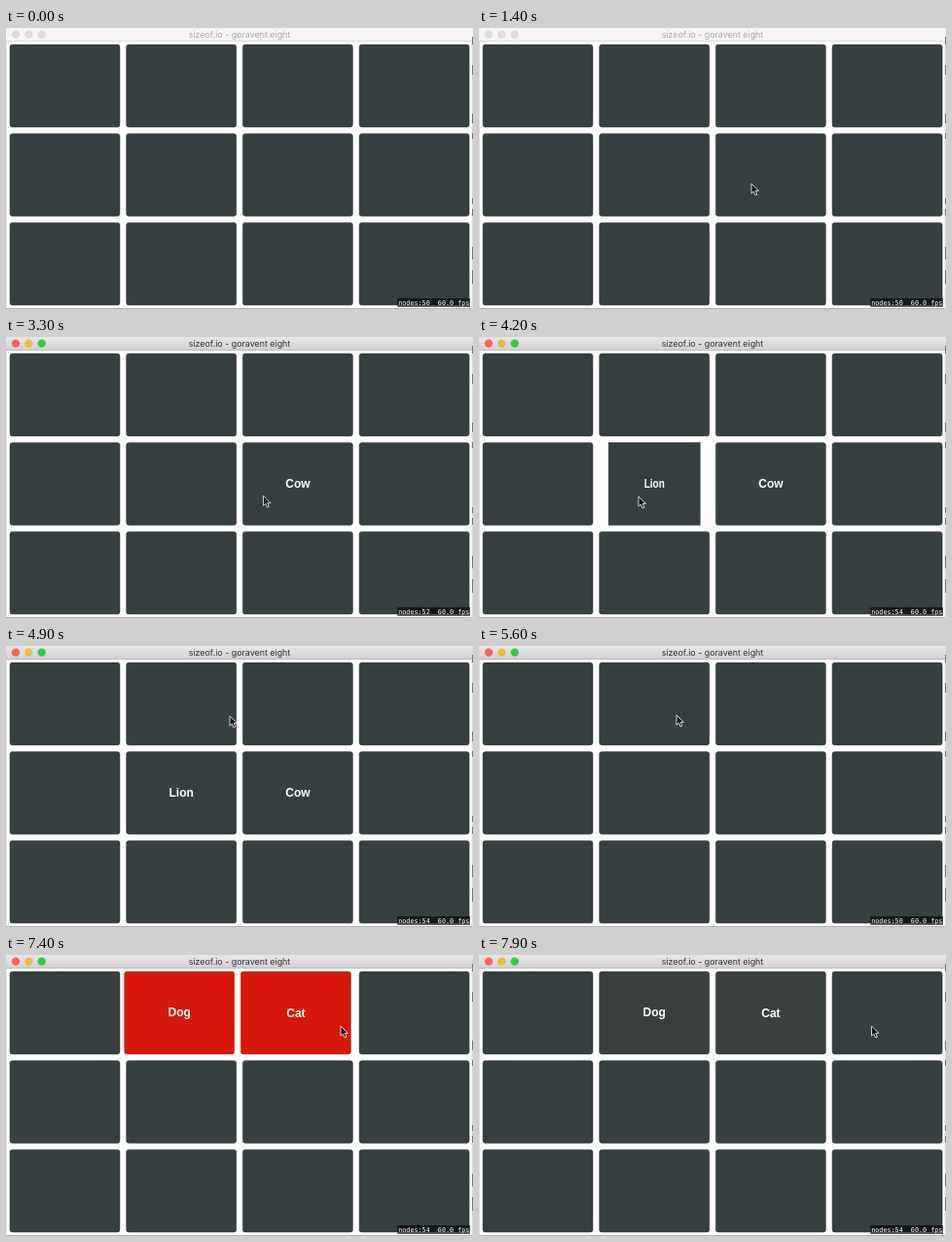
An HTML page that plays this animation: 480 px wide and 289 px high, repeating every 8 s.

```html
<!DOCTYPE html>
<html lang="en">
<head>
<meta charset="utf-8">
<title>Memory cards</title>
<style>
  html, body { margin: 0; width: 100%; height: 100%; overflow: hidden; background: #fff; }
  svg { display: block; width: 480px; height: 289px; }
  .title { font: 8.9px Inter, "Liberation Sans", sans-serif; text-anchor: middle; }
  .face { font: bold 12px "Liberation Sans", Arial, sans-serif; text-anchor: middle; fill: #fff; }
  .stats { font: 6.75px "DejaVu Sans Mono", monospace; fill: #fff; white-space: pre; }
</style>
</head>
<body>
<svg id="stage" viewBox="0 0 480 289">
  <defs>
    <linearGradient id="bar" x1="0" y1="0" x2="0" y2="1">
      <stop offset="0" stop-color="#e9e7e9"/>
      <stop offset="1" stop-color="#d2d0d2"/>
    </linearGradient>
  </defs>
  <rect width="480" height="289" fill="#fff"/>
  <g id="edges"></g>
  <g id="chrome"></g>
  <g id="cards"></g>
  <rect x="402.3" y="278" width="74.7" height="9" fill="#000" fill-opacity=".62"/>
  <text id="stats" class="stats" x="403.2" y="284.6" xml:space="preserve"></text>
  <path id="cursor" d="M0 0V10.2L2.3 8.1L4 12L5.8 11.2L4.2 7.4H7.3Z"
        fill="#111" stroke="#fff" stroke-width=".8" stroke-linejoin="round"/>
</svg>
<script>
const LOOP = 8000, STEP = 100, FLIP = 300;
const GREY = [55, 64, 64], RED = [214, 24, 10];
const W = 113, H = 84.8;

// Times a card opens, its pair is judged wrong, and it closes again.
const plays = [
  { col: 2, row: 1, name: 'Cow',  open: 2925, wrong: 4225, close: 5175 },
  { col: 1, row: 1, name: 'Lion', open: 3925, wrong: 4225, close: 5175 },
  { col: 1, row: 0, name: 'Dog',  open: 5825, wrong: 7325, close: 8275 },
  { col: 2, row: 0, name: 'Cat',  open: 7025, wrong: 7325, close: 8275 }
];

// time, x, y of the pointer tip
const path = [
  [100, 484, 184], [500, 392, 150], [900, 262, 136], [1400, 280, 160],
  [1900, 298, 164], [2600, 299, 163], [3100, 299, 163], [3700, 166, 164],
  [4200, 164, 164], [4500, 172, 150], [4900, 230, 72], [5300, 204, 71],
  [5900, 202, 71], [6400, 342, 70], [6500, 343.5, 70.5], [6900, 344, 73],
  [7500, 344, 73], [7900, 403.5, 73], [8000, 406, 73]
];

const $ = id => document.getElementById(id);
const clamp = v => Math.min(1, Math.max(0, v));

function add(parent, tag, attrs, text) {
  const el = document.createElementNS('http://www.w3.org/2000/svg', tag);
  set(el, attrs);
  if (text) el.textContent = text;
  parent.append(el);
  return el;
}

function set(el, attrs) {
  for (const key in attrs) el.setAttribute(key, attrs[key]);
}

// Window frame and the sliver of desktop beside it
const edges = $('edges');
add(edges, 'rect', { x: 0, y: 13, width: .5, height: 276, fill: '#c4c2c4' });
add(edges, 'rect', { x: 0, y: 288, width: 480, height: 1, fill: '#b3b1b3' });
add(edges, 'rect', { x: 478.6, y: 13, width: 1.4, height: 276, fill: '#dedcde' });
for (const [y, h] of [[38, 10], [88, 10], [108, 6], [175, 6], [186, 7], [225, 13], [249, 14]])
  add(edges, 'rect', { x: 479, y, width: 1, height: h, fill: '#77757a' });

const chrome = $('chrome');
const bar = add(chrome, 'rect', { width: 480, height: 13.5 });
const rule = add(chrome, 'rect', { y: 13, width: 480, height: .8 });
add(chrome, 'rect', { x: 479, y: 9, width: 1, height: 8, fill: '#77757a' });
const lights = ['#fa5f59', '#e6bf3b', '#35c84b'].map((color, i) => ({
  color, el: add(chrome, 'circle', { cx: 10 + i * 13.35, cy: 6.6, r: 4.2 })
}));
const title = add(chrome, 'text', { class: 'title', x: 240, y: 9.8 }, 'sizeof.io - goravent eight');

const cards = [];
for (let row = 0; row < 3; row++) for (let col = 0; col < 4; col++) {
  const cx = 60.5 + col * 119.7, cy = 59.5 + row * 91.55;
  const play = plays.find(p => p.col === col && p.row === row);
  const group = add($('cards'), 'g', { transform: `translate(${cx} ${cy})` });
  const box = add(group, 'rect', {
    x: -W / 2, y: -H / 2, width: W, height: H, rx: 2.6,
    fill: `rgb(${GREY})`, stroke: '#2b3335', 'stroke-width': .5
  });
  if (!play) continue;
  const base = play.name.includes('g') ? 3.1 : 4.3;
  const label = add(group, 'text', { class: 'face', x: 0, y: base }, play.name);
  cards.push({ ...play, cx, cy, group, box, label });
}

function flipScale(age) {
  return age <= 0 || age >= FLIP ? 1 : Math.max(.02, Math.abs(1 - 2 * age / FLIP));
}

function drawCard(card, t) {
  const { open, wrong, close, cx, cy } = card;
  const scale = flipScale(t - open) * flipScale(t - close);
  const shown = t >= open + FLIP / 2 && t < close + FLIP / 2;
  const age = t - wrong;
  const shake = age > 0 && age < 300 ? -2 * Math.sin(2 * Math.PI * age / 300) : 0;
  const heat = age < 0 ? 0 : clamp(age / 50) * (1 - clamp((age - 300) / 280));
  const color = GREY.map((g, i) => Math.round(g + (RED[i] - g) * heat));
  set(card.group, { transform: `translate(${cx + shake} ${cy}) scale(${scale} 1)` });
  set(card.box, {
    rx: scale < 1 ? 0 : 2.6,
    fill: `rgb(${color})`,
    stroke: heat > .2 ? `rgb(${color})` : '#2b3335'
  });
  set(card.label, { visibility: shown ? 'visible' : 'hidden' });
  return shown;
}

function drawChrome(active) {
  set(bar, { fill: active ? 'url(#bar)' : '#f6f5f6' });
  set(rule, { fill: active ? '#b4b2b4' : '#d6d4d6' });
  set(title, { fill: active ? '#333' : '#aaa' });
  for (const { el, color } of lights) set(el, { fill: active ? color : '#dcdbdc' });
}

function drawCursor(t) {
  const i = path.findIndex(p => p[0] > t);
  set($('cursor'), { visibility: i > 0 ? 'visible' : 'hidden' });
  if (i < 1) return;
  const [t0, x0, y0] = path[i - 1], [t1, x1, y1] = path[i];
  const u = (t - t0) / (t1 - t0), k = u * u * (3 - 2 * u);
  set($('cursor'), { transform: `translate(${x0 + (x1 - x0) * k} ${y0 + (y1 - y0) * k})` });
}

function draw(t) {
  drawChrome(t >= 2200);
  const shown = cards.filter(card => drawCard(card, t)).length;
  const fps = t >= 2300 && t < 2900 ? '59.0' : '60.0';
  $('stats').textContent = `nodes:${50 + 2 * shown}  ${fps} fps`;
  drawCursor(t);
}

const start = performance.now();
function tick() {
  const t = (performance.now() - start) % LOOP;
  draw(Math.floor(t / STEP) * STEP);
  requestAnimationFrame(tick);
}
tick();
</script>
</body>
</html>
```
